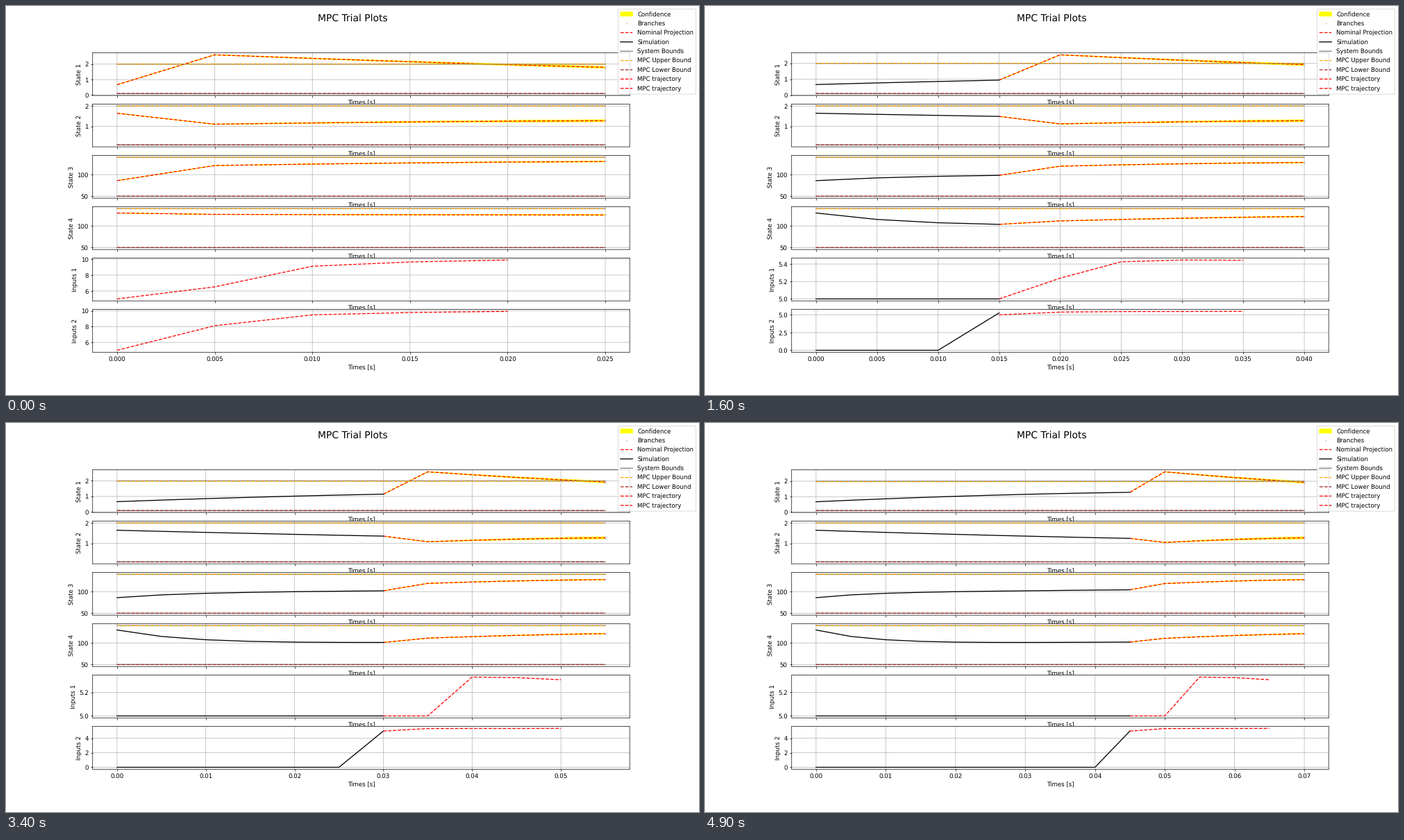
Recreate the animation shown at these times as a matplotlib script. Size 998 by 561 pixels, loop 5 s.

```python
import matplotlib.pyplot as plt
import numpy as np
from matplotlib.animation import FuncAnimation

WIDTH, HEIGHT, DPI = 998, 561, 62.375
FRAMES, INTERVAL = 50, 100
FRAMES_PER_STEP, SETTLED_STEP = 5, 5
DT, HORIZON = 0.005, 5
START = 5  # first planned value of both inputs

# Soft, unsnapped edges at this small resolution.
plt.rcParams.update({"path.snap": False, "text.hinting": "none"})

# Simulated path of each state as a function of the step number.
PATHS = [
    lambda k: 0.667 + 0.105 * k - 0.0041 * k**2,
    lambda k: 1.645 - 0.055 * k + 0.0012 * k**2,
    lambda k: 97.7 + 0.73 * k - 11.7 * np.exp(-k / 1.5),
    lambda k: 97.5 + 0.5 * k + 32.5 * np.exp(-k / 1.55),
]
LIMITS = [(0.1, 2), (0.1, 2), (50, 140), (50, 140)]
SPREADS = [0.06, 0.05, 1.0, 1.0]

# The prediction bends from its first to its last value;
# both drift through three key points over the loop.
KEYS = [0, 16, 49]
FIRST = [(2.6, 2.54, 2.61), (1.11, 1.125, 1.05),
         (121, 119.5, 118.7), (126.8, 111.7, 110.7)]
LAST = [(1.79, 1.92, 1.93), (1.28, 1.28, 1.275),
        (130.3, 128, 127.6), (125.4, 121.8, 121.4)]
BENDS = [0.2, 0.6, 0.6, 0.45]


def bent(bend):
    """Ease from 0 to 1 over the predicted points."""
    s = np.linspace(0, 1, HORIZON)
    return s + bend * s * (1 - s)


def decay(frame):
    return np.exp(-frame / 4.5)


def plan_inputs(frame, settled):
    """Planned values of both inputs, shrinking as the solver converges."""
    mix = min(frame / 22, 1) ** 2
    early = np.array([[0, 0.31, 0.84, 0.95, 1], [0, 0.63, 0.91, 0.97, 1]])
    late = np.array([[0, 0 if settled else 0.7, 1, 0.985, 0.93],
                     [0, 0.93, 0.97, 0.96, 1]])
    height = np.array([[0.33], [0.37]]) + 4.56 * decay(frame)
    return START + height * (early + mix * (late - early))


def padded(*values):
    """Axis limits with the usual five percent margin."""
    data = np.concatenate([np.ravel(v) for v in values])
    low, high = data.min(), data.max()
    margin = 0.05 * (high - low)
    return low - margin, high + margin


fig, axes = plt.subplots(6, 1, sharex=True, dpi=DPI,
                         figsize=(WIDTH / DPI, (HEIGHT + 1e-4) / DPI))
fig.suptitle("MPC Trial Plots", fontsize=16)


def add_line(ax, label, color, style="-", **kwargs):
    return ax.plot([], [], style, color=color, label=label, **kwargs)[0]


def state_artists(ax):
    band = ax.fill([0, 0, 0], [0, 0, 0], facecolor="yellow",
                   edgecolor="yellow", linewidth=1, label="Confidence")[0]
    return [
        band,
        add_line(ax, "Branches", "thistle", "o", markersize=1.3, zorder=2.5),
        add_line(ax, "Nominal Projection", "red", "--"),
        add_line(ax, "Simulation", "black"),
        add_line(ax, "System Bounds", "gray"),
        add_line(ax, "MPC Upper Bound", "orange", "--"),
        add_line(ax, "MPC Lower Bound", "brown", "--"),
    ]


def input_artists(ax):
    return [add_line(ax, "Simulation", "black"),
            add_line(ax, "MPC trajectory", "red", "--")]


state_plots = [state_artists(ax) for ax in axes[:4]]
input_plots = [input_artists(ax) for ax in axes[4:]]
for i, ax in enumerate(axes):
    ax.set_ylabel(f"State {i + 1}" if i < 4 else f"Inputs {i - 3}")
    ax.set_xlabel("Times [s]")
    ax.grid(True)
fig.legend(handles=state_plots[0] + [plot[1] for plot in input_plots],
           loc="upper right", labelspacing=0.54)


def draw_state(i, frame, step):
    low, high = LIMITS[i]
    band, branches, nominal, simulation, system, upper, lower = state_plots[i]
    past = np.arange(step + 1)
    path = PATHS[i](past)
    ahead = DT * np.arange(step, step + HORIZON + 1)
    span = [0, ahead[-1]]

    first, last = (np.interp(frame, KEYS, ends[i]) for ends in (FIRST, LAST))
    plan = np.r_[path[-1], first + (last - first) * bent(BENDS[i])]
    spread = SPREADS[i] * np.linspace(0, 1, HORIZON + 1)
    top, bottom = plan + spread, plan - spread

    band.set_xy(np.column_stack([np.r_[ahead, ahead[::-1]],
                                 np.r_[top, bottom[::-1]]]))
    branches.set_data([ahead[-1]] * 3, [bottom[-1], plan[-1], top[-1]])
    nominal.set_data(ahead, plan)
    simulation.set_data(DT * past, path)
    # One line for both limits, broken in the middle.
    system.set_data(span + [np.nan] + span, [low, low, np.nan, high, high])
    tightened = i == 0 and step >= SETTLED_STEP
    upper.set_data(span, [high - 0.03 * tightened] * 2)
    lower.set_data(span, [low, low])
    axes[i].set_ylim(padded(top, bottom, path, [low, high]))


def draw_inputs(frame, step):
    settled = step >= SETTLED_STEP
    plans = plan_inputs(frame, settled)
    kick = START if settled or step == 0 else 5.25 + 0.9 * decay(frame)
    applied = [np.full(step + 1, START), np.r_[np.zeros(step), kick]]
    for i, (simulation, trajectory) in enumerate(input_plots):
        simulation.set_data(DT * np.arange(step + 1), applied[i])
        trajectory.set_data(DT * np.arange(step, step + HORIZON), plans[i])
        axes[4 + i].set_ylim(padded(applied[i], plans[i]))


def update(frame):
    step = frame // FRAMES_PER_STEP
    for i in range(len(state_plots)):
        draw_state(i, frame, step)
    draw_inputs(frame, step)
    axes[0].set_xlim(padded([0, DT * (step + HORIZON)]))
    return []


animation = FuncAnimation(fig, update, frames=FRAMES, interval=INTERVAL,
                          init_func=lambda: update(0), repeat=True,
                          repeat_delay=0, blit=False)
plt.show()
```
